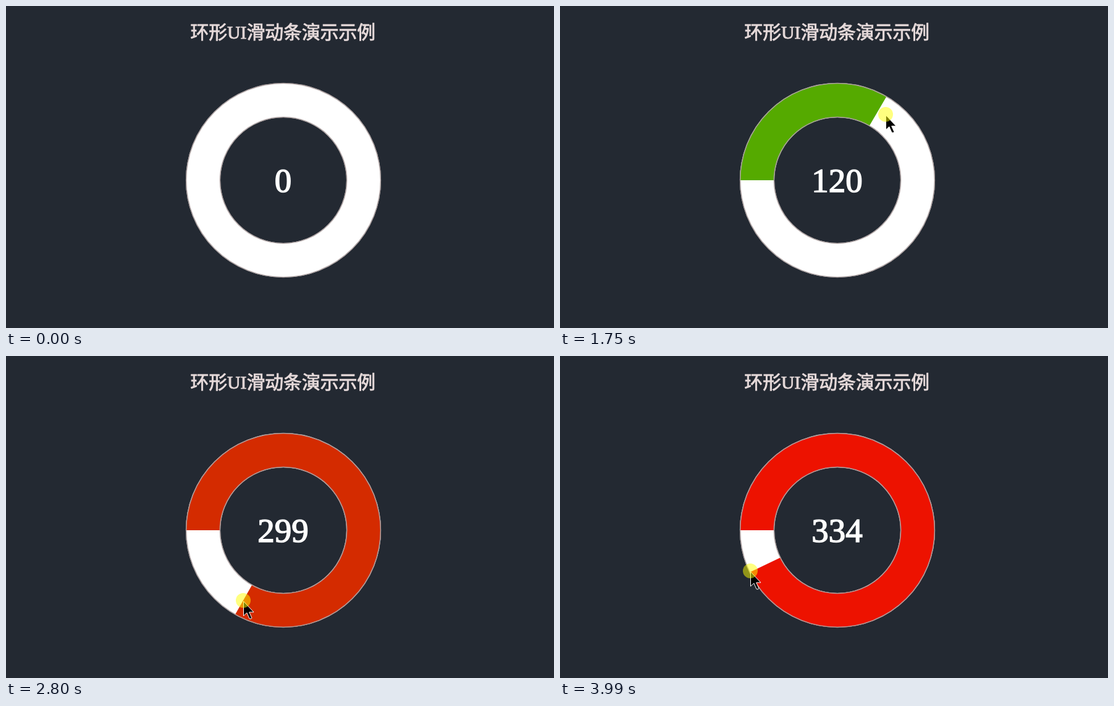
Animation of 887x523 px, one loop 4.06 s. Source, as an HTML page:

```html
<!DOCTYPE html>
<html lang="zh">
<head>
<meta charset="utf-8">
<style>
  html, body { margin: 0; width: 100%; height: 100%; overflow: hidden; background: #232932; }
  svg { display: block; }
  text { text-anchor: middle; font-family: "Liberation Serif", "Noto Sans CJK SC", "Noto Sans CJK", serif; }
  circle { fill: none; }
</style>
</head>
<body>
<svg width="887" height="523" viewBox="0 0 887 523">
  <text x="448.3" y="53.3" font-size="29.8" fill="#e6dada" stroke="#e6dada" stroke-width=".9">环形UI滑动条演示示例</text>
  <g transform="translate(449 283) rotate(180)">
    <circle r="130" stroke="#fff" stroke-width="56"/>
    <circle id="fill" r="130" stroke-width="56" pathLength="360"/>
    <g stroke="#aca0a0" stroke-width="1.5">
      <circle r="157.4"/>
      <circle r="102.6"/>
    </g>
  </g>
  <text id="label" x="448.5" y="302" font-size="55" fill="#fff" stroke="#fff" stroke-width="1.5"></text>
  <g id="cursor">
    <path d="M.5 .5V24L5.8 19L10 28.5Q12 30 14 27.5L9.7 18H17Z" fill="#000" stroke="#fff"/>
    <circle id="press" cy="-1" r="12" style="fill:#ff0;fill-opacity:.5"/>
  </g>
</svg>
<script>
const LOOP = 4060, STEP = 70, PRESS = 1190, RESUME = 3490, LAG = 13;
const [fill, label, cursor, press] = ['fill', 'label', 'cursor', 'press'].map(id => document.getElementById(id));

const linear = p => p;
const swing = p => (1 - Math.cos(Math.PI * p)) / 2;

// time, x, y
const approach = [[70, 799, 497], [560, 572, 313], [840, 376, 267], [1190, 329, 277]];
// time, degrees clockwise from the left, radius
const drag = [
  [1190, 3, 120], [1330, 11.4, 124], [2310, 307, 145], [2800, 299.7, 132],
  [3290, 195, 138], [3490, 195, 138], [3630, 207.5, 147.6], [3980, 334.7, 156]
];

// Pose on a track of key points, eased within each leg
function pose(keys, t, ease) {
  const next = Math.max(1, keys.findIndex(k => k[0] > t));
  const end = t >= keys.at(-1)[0] ? keys.length - 1 : next;
  const a = keys[end - 1], b = keys[end];
  const p = ease(Math.min(1, Math.max(0, (t - a[0]) / (b[0] - a[0]))));
  return [1, 2].map(n => a[n] + (b[n] - a[n]) * p);
}

function draw(time) {
  const start = time < RESUME ? 0 : RESUME;
  const t = time - (time - start) % STEP;
  const pressed = t >= PRESS;
  let [x, y] = pose(approach, t, linear), value = 0;
  if (pressed) {
    const [deg, r] = pose(drag, t, swing), angle = deg * Math.PI / 180;
    x = 449 - r * Math.cos(angle);
    y = 283 - r * Math.sin(angle);
    value = pose(drag, t - LAG, swing)[0];
  }
  const red = Math.round(value / 360 * 255);
  fill.setAttribute('stroke', `rgb(${red},${255 - red},0)`);
  fill.setAttribute('stroke-dasharray', `${value} 360`);
  label.textContent = Math.floor(value);
  cursor.setAttribute('transform', `translate(${Math.round(x)} ${Math.round(y)})`);
  cursor.style.display = t < STEP ? 'none' : '';
  fill.style.display = press.style.display = pressed ? '' : 'none';
}

const begin = performance.now();
function tick() {
  draw((performance.now() - begin) % LOOP);
  requestAnimationFrame(tick);
}
tick();
</script>
</body>
</html>
```
